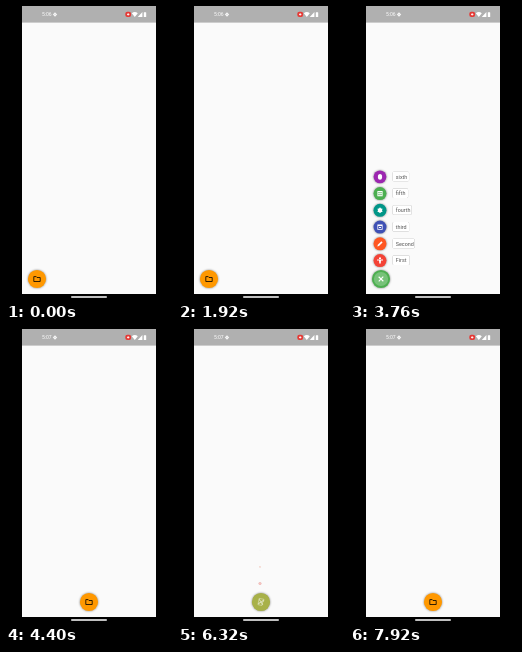
Recreate the animation shown at these times as an HTML page. Size 166 px wide and 295 px high, loop 8000 ms.

```html
<!DOCTYPE html>
<html lang="en">
<head>
<meta charset="utf-8">
<title>Speed dial</title>
<style>
html, body { margin: 0; width: 100%; height: 100%; overflow: hidden; background: #000; }
svg { display: block; width: 100%; height: 100%; }
text { font-family: Roboto, sans-serif; }
.line { fill: none; stroke: currentColor; }
.shade { filter: drop-shadow(0 .8px .9px #0007); }
.card { filter: drop-shadow(0 .4px .5px #0007); }
</style>
</head>
<body>
<svg viewBox="0 0 166 295">
  <rect width="166" height="295"/>
  <rect x="16" width="134" height="288" fill="#fafafa"/>
  <rect x="16" width="134" height="16.6" fill="#b0b0b0"/>
  <g fill="#fff">
    <text id="clock" x="36" y="10.3" font-size="5"></text>
    <circle cx="49" cy="8.5" r="1.3" fill="none" stroke="#fff" stroke-width=".9"/>
    <path d="M49 6.4v4.2M46.9 8.5h4.2" stroke="#fff" stroke-width=".5"/>
    <rect x="119.3" y="5.8" width="5.8" height="5.2" rx="2" fill="#e53935"/>
    <path d="M121 8.4h2.4M122.2 7.3v2.2" stroke="#fff" stroke-width=".9"/>
    <path d="M125.8 7.2q3-2.4 6 0l-3 3.9zM136.4 6v5h-4.6zM137.8 6.5h.7v-.6h1v.6h.7v4.6h-2.4z"/>
    <rect x="65" y="290.3" width="36" height="1.5" rx=".75"/>
  </g>
  <g id="dial">
    <g id="items"></g>
    <g transform="translate(31 273)">
      <circle id="fab" r="9.1" class="shade"/>
      <circle id="splash"/>
      <g id="icon">
        <path id="folder" class="line" stroke-width=".8" d="M-3.2-2.4H-.8L0-1.5H3.2V2.5H-3.2Z"/>
        <path id="cross" class="line" stroke-width="1.1" d="M-2.3-2.3 2.3 2.3M2.3-2.3-2.3 2.3"/>
      </g>
    </g>
  </g>
</svg>
<script>
const $ = id => document.getElementById(id);
const LOOP = 8000, MOVE = 4160;
const DELAY = 140, CLOSE_DELAY = 160, SPAN = 180;
const taps = [480, 1360, 2240, 3600, 4480, 5360, 6080, 7520]; // open, close, open, ...
const orange = [255, 152, 0], green = [76, 175, 80];

// label, colour, card width, icon path (white fill)
const items = [
  ['First', '#f44336', 17, 'M-1-3h2v1.5h-2zM-3-1H3V0H1V3H.2V1H-.2V3H-1V0H-3z'],
  ['Second', '#ff5722', 22, 'M-2.6 2.6-2.2 1 1.4-2.6 2.6-1.4-1 2.2z'],
  ['third', '#3f51b5', 16.5, 'M-2.6-2.6H2.6V2.6H-2.6zM-1.8-1V1.8H1.8V-1zM-1 0H1V1H-1z'],
  ['fourth', '#009688', 19, 'M0-3 1-1.8 2.6-1.5 2 0 2.6 1.5 1 1.8 0 3-1 1.8-2.6 1.5-2 0-2.6-1.5-1-1.8z'],
  ['fifth', '#4caf50', 15.5, 'M-2.6-2.6H2.6V2.6H-2.6zM-1.6-1.6V-.4H-.4V-1.6zM.4-1.6V-.4H1.6V-1.6zM-1.6.4V1.6H-.4V.4zM.4.4V1.6H1.6V.4z'],
  ['sixth', '#9c27b0', 16.5, 'M-2.1-1.2Q-1.8-3 0-3T2.1-1.2V1Q2 3 0 3T-2.1 1z']
];
$('items').innerHTML = items.map(([label, color, width, path], i) => `
  <g transform="translate(30 ${254.6 - 16.75 * i})">
    <g class="button"><circle r="6.5" fill="${color}" class="shade"/>
      <path d="${path}" fill="#fff" fill-rule="evenodd"/></g>
    <g class="label"><rect x="12.6" y="-5" width="${width}" height="9.4" rx="1.3" fill="#fff" class="card"/>
      <text x="15.8" y="1.8" font-size="5.4" fill="#555">${label}</text></g>
  </g>`).join('');
const buttons = document.querySelectorAll('.button');
const labels = document.querySelectorAll('.label');
const clamp = v => Math.min(1, Math.max(0, v));

function draw(t) {
  const n = taps.filter(tap => tap <= t).length;
  const since = n ? t - taps[n - 1] : 1e4;
  const opening = n % 2 === 1;
  const p = clamp((since - (opening ? DELAY : CLOSE_DELAY)) / SPAN);
  const open = opening ? p : 1 - p;
  const moved = t >= MOVE;

  $('clock').textContent = moved ? '5:07' : '5:06';
  $('dial').setAttribute('transform', `translate(${moved ? 52 : 0} 0)`);
  $('fab').setAttribute('fill', `rgb(${orange.map((c, i) => c + (green[i] - c) * open)})`);

  const ink = Math.round(255 * clamp(open * 1.8));
  $('icon').style.color = `rgb(${ink},${ink},${ink})`;
  $('icon').setAttribute('transform', `rotate(${180 * open})`);
  $('folder').setAttribute('opacity', 1 - open);
  $('cross').setAttribute('opacity', open);

  $('splash').setAttribute('r', 2 + 7 * clamp(since / 220));
  $('splash').setAttribute('fill', '#fff');
  $('splash').setAttribute('opacity', .24 * clamp(since / 80) * clamp((320 - since) / 140));

  buttons.forEach((button, i) => {
    const s = clamp((open - .48 - .03 * i) / .37);
    button.setAttribute('transform', `scale(${s})`);
    button.setAttribute('opacity', clamp(s * 1.6));
    labels[i].setAttribute('opacity', clamp(s * 2 - 1));
  });
}

const start = performance.now();
function tick() {
  draw((performance.now() - start) % LOOP);
  requestAnimationFrame(tick);
}
tick();
</script>
</body>
</html>
```
